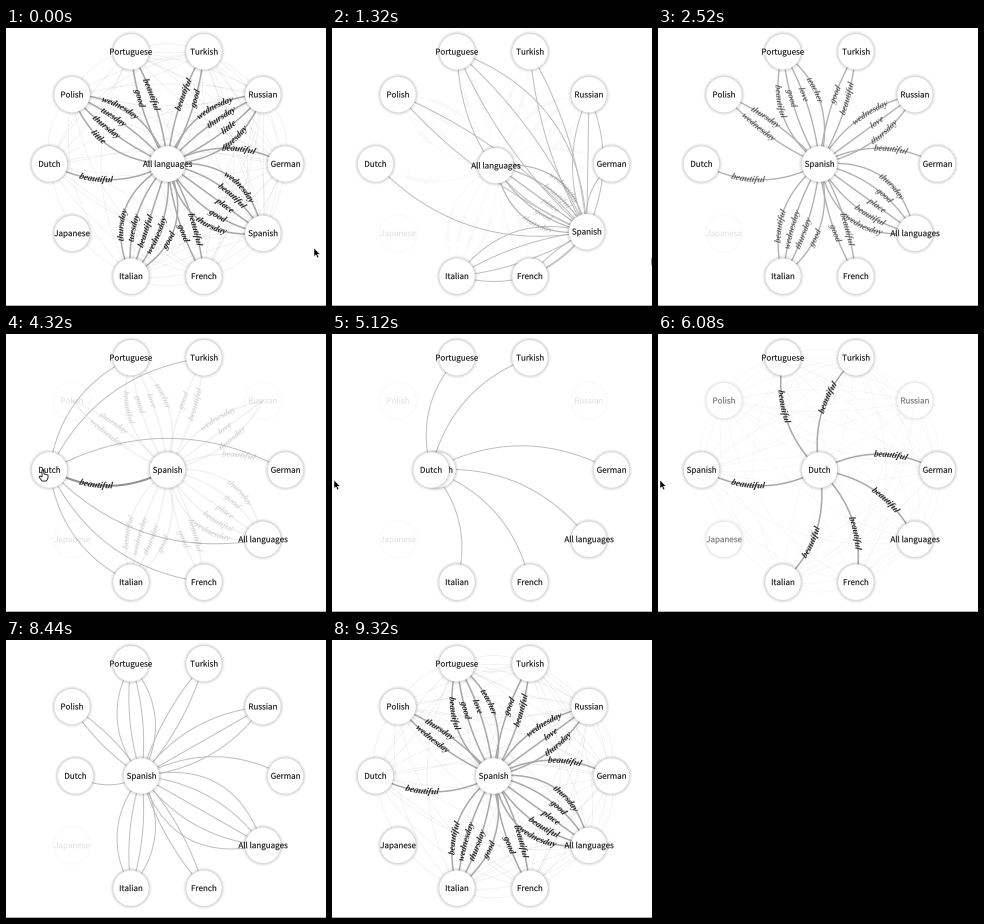
A matplotlib script for the animation above (9600 ms loop, 320 px wide and 278 px high).

```python
import itertools
import random

import matplotlib.pyplot as plt
import numpy as np
from matplotlib.animation import FuncAnimation
from matplotlib.collections import LineCollection, PathCollection
from matplotlib.patches import Circle, PathPatch, Polygon
from matplotlib.path import Path
from matplotlib.textpath import TextPath

WIDTH, HEIGHT, DPI = 320, 278, 64
LOOP_MS, STEP_MS = 9600, 40
PT = 72 / DPI
CENTER = np.array([161.5, 136.0])
RADIUS = 118

RING = ["German", "Spanish", "French", "Italian", "Japanese",
        "Dutch", "Polish", "Portuguese", "Turkish", "Russian"]
SLOTS = {name: CENTER + RADIUS * np.array([np.cos(a), np.sin(a)])
         for name, a in zip(RING, np.arange(10) * np.pi / 5)}
SLOTS["All languages"] = CENTER

# Shared words per focused language, listed from the left-hand curve outwards.
WORDS = {
    "All languages": {
        "Polish": "little thursday tuesday wednesday",
        "Portuguese": "good beautiful",
        "Turkish": "beautiful good",
        "Russian": "wednesday thursday little tuesday",
        "German": "beautiful",
        "Spanish": "wednesday beautiful place good thursday",
        "French": "beautiful good",
        "Italian": "good wednesday beautiful tuesday thursday",
        "Dutch": "beautiful",
    },
    "Spanish": {
        "Polish": "wednesday thursday",
        "Portuguese": "beautiful good love teacher",
        "Turkish": "good beautiful",
        "Russian": "wednesday love thursday",
        "German": "beautiful",
        "All languages": "thursday good place beautiful wednesday",
        "French": "beautiful good",
        "Italian": "good thursday wednesday beautiful",
        "Dutch": "beautiful",
    },
    "Dutch": {name: "beautiful" for name in
              ["Portuguese", "Turkish", "German", "All languages",
               "French", "Italian", "Spanish"]},
}

# hover start, hover end, click, old focus, new focus
CYCLES = [(0, 280, 1000, "All languages", "Spanish"),
          (3320, 3640, 4320, "Spanish", "Dutch"),
          (6280, 6520, 7440, "Dutch", "Spanish")]

U = np.linspace(0, 1, 41)


def ramp(t, start, end):
    return min(1.0, max(0.0, (t - start) / (end - start)))


def ease(u):
    return 4 * u ** 3 if u < 0.5 else 1 - 4 * (1 - u) ** 3


def left_of(v):
    return np.array([v[1], -v[0]])


def bulges(count):
    half = 0.056 * (count - 1)
    return [0.134] if count == 1 else np.linspace(half, -half, count)


def arc(a, b, bulge):
    d = b - a
    return a + np.outer(U, d) + np.outer(4 * bulge * U * (1 - U), left_of(d))


def outward_sign(a, b):
    return 1 if np.dot((a + b) / 2 - CENTER, left_of(b - a)) > -1 else -1


def centered_outline(text, size, **font):
    outline = TextPath((0, 0), text, size=size, prop=font)
    box = outline.get_extents()
    return outline.vertices - [(box.x0 + box.x1) / 2, 0], outline.codes


GLYPHS = {}
for text in set(" ".join(w for d in WORDS.values() for w in d.values()).split()):
    verts, codes = centered_outline(text, 9, family="Liberation Serif",
                                    style="italic", weight="bold")
    verts[:, 1] -= 2.4
    verts[:, 0] += 0.15 * verts[:, 1]
    GLYPHS[text] = verts, codes


def bend(word, curve):
    """Lay a word along a curve, always reading from left to right."""
    verts, codes = GLYPHS[word]
    share = 0.6
    if curve[-1, 0] < curve[0, 0]:
        curve, share = curve[::-1], 0.4
    steps = np.hypot(*np.diff(curve, axis=0).T)
    length = np.concatenate([[0], np.cumsum(steps)])
    tangent = np.gradient(curve, axis=0)
    tangent /= np.hypot(*tangent.T)[:, None] + 1e-9
    s = share * length[-1] + verts[:, 0]
    x, y, tx, ty = (np.interp(s, length, col) for col in (*curve.T, *tangent.T))
    return Path(np.column_stack([x + ty * verts[:, 1], y - tx * verts[:, 1]]), codes)


random.seed(4)
MESH_COUNT = {}
for pair in itertools.combinations(sorted(SLOTS), 2):
    MESH_COUNT[pair] = 0 if "Japanese" in pair else random.choice([1, 1, 2, 3])


def mesh_arcs(places, focus):
    curves = []
    for (m, n), count in MESH_COUNT.items():
        if count and focus not in (m, n):
            sign = outward_sign(places[m], places[n])
            curves += [arc(places[m], places[n], sign * k) for k in bulges(count)]
    return curves


fig = plt.figure(figsize=(WIDTH / DPI, HEIGHT / DPI), dpi=DPI, facecolor="white")
ax = fig.add_axes([0, 0, 1, 1])
ax.set(xlim=(0, WIDTH), ylim=(HEIGHT, 0))
ax.axis("off")
ax.plot([0, WIDTH], [277, 277], color="0.7", lw=PT)

mesh = LineCollection([], linewidths=0.7 * PT, zorder=1)
links = LineCollection([], zorder=2)
labels = PathCollection([], linewidths=0, zorder=3)
for layer in (mesh, links, labels):
    ax.add_collection(layer, autolim=False)


class Node:
    SHADOW = [(20.2, 0.035), (19.2, 0.08), (18.2, 0.14)]

    def __init__(self, name):
        self.discs = [(Circle((0, 0), 18, color="white", lw=0), 1)]
        self.discs += [(Circle((0, 0), r, fill=False, ec="black", lw=1.1 * PT), a)
                       for r, a in self.SHADOW]
        self.verts, self.codes = centered_outline(name, 8, family="Noto Sans CJK JP")
        self.label = PathPatch(Path(self.verts, self.codes), fc="0.05",
                               ec="0.05", lw=0.12 * PT)
        for patch in [disc for disc, _ in self.discs] + [self.label]:
            ax.add_patch(patch)

    def place(self, pos, alpha, zorder):
        for disc, strength in self.discs:
            disc.set(center=pos, alpha=strength * alpha, zorder=zorder)
        self.label.set_path(Path(self.verts * [1, -1] + pos + [0, 2.8], self.codes))
        self.label.set(alpha=alpha, zorder=zorder)


nodes = {name: Node(name) for name in SLOTS}

ARROW = np.array([(0, 0), (0, 8.5), (2, 6.8), (3.4, 10), (4.8, 9.3),
                  (3.5, 6.3), (6, 6.2)])
HAND = np.array([(-1, -2), (0.5, -2), (1, 2), (5, 3), (5, 6), (3.5, 9),
                 (-1, 9), (-4, 5), (-3, 4), (-1, 5)])
arrow = ax.add_patch(Polygon(ARROW, fc="black", ec="white", lw=0.5 * PT, zorder=9))
hand = ax.add_patch(Polygon(HAND, fc="white", ec="black", lw=0.8 * PT, zorder=9))
CURSOR = np.array([
    (0, 308, 220), (40, 308, 220), (120, 257, 212), (1080, 257, 212),
    (1400, 340, 235), (3280, 340, 235), (3281, -20, 150), (3320, 6, 146),
    (3440, 37, 138), (4440, 37, 138), (4720, 2, 146), (6200, 2, 146),
    (6280, 37, 138), (7640, 37, 138), (7641, -40, 138)])


def draw_cursor(t):
    tip = np.array([np.interp(t, CURSOR[:, 0], CURSOR[:, k]) for k in (1, 2)])
    over = any(np.hypot(*(tip - spot)) < 17 for spot in SLOTS.values())
    arrow.set(xy=ARROW + tip, visible=not over)
    hand.set(xy=HAND + tip, visible=over)


def draw(frame):
    t = frame * STEP_MS
    places = dict(SLOTS)
    for cycle in CYCLES:
        start, end, click, old, new = cycle
        following = [c for c in CYCLES if c[0] > start]
        if not following or t < following[0][0]:
            break
        places[old], places[new] = places[new], places[old]

    since = t - click
    hover = ramp(t, max(start, 40), end)
    move = ease(ramp(since, 40, 1590))
    fade_out = ramp(since, 0, 400)
    words_in = ramp(since, 1280, 1640)
    settle = ramp(since, 1640, 1880)

    before = dict(places)
    places[old] = before[old] + move * (before[new] - before[old])
    places[new] = before[new] + move * (before[old] - before[new])

    curves, colors, widths, paths, inks = [], [], [], [], []

    def add_link(a, b, words, alpha, ink, strength, sign=1):
        words = words.split()
        for word, k in zip(words, bulges(len(words))):
            curve = arc(places[a], places[b], k * sign)
            curves.append(curve)
            colors.append((0.75 - 0.09 * strength,) * 3 + (alpha,))
            widths.append((1 + 0.5 * strength) * PT)
            if ink > 0.01:
                paths.append(bend(word, curve))
                inks.append((0.16, 0.16, 0.16, ink))

    dim = (1 - 0.85 * hover) * (1 - fade_out)
    for other, words in WORDS[old].items():
        if other != new and dim > 0:
            add_link(old, other, words, dim, dim, 1)

    for other, words in WORDS[new].items():
        if other != old and hover > 0:
            sign = 1 if since > 0 else outward_sign(before[new], before[other])
            add_link(new, other, words, hover, words_in, words_in, sign)

    a, b = (old, new) if move < 0.5 else (new, old)
    emphasis = 1 + hover
    add_link(a, b, WORDS[a][b], 1, max(1 - fade_out, words_in),
             max(emphasis * (1 - fade_out), words_in))

    links.set(segments=curves, color=colors, linewidths=widths)
    labels.set_paths(paths)
    labels.set_facecolor(inks)

    focus, haze = (new, settle) if since > 0 else (old, 1 - hover)
    mesh.set(segments=mesh_arcs(places, focus) if haze > 0 else [],
             color=(0, 0, 0, 0.065 * haze))

    for i, (name, node) in enumerate(nodes.items()):
        linked = name in (old, new) or name in WORDS[new]
        alpha = 1 if linked else 1 - 0.9 * hover * (1 - settle)
        node.place(places[name], alpha, 6 if name == new else 5 + i * 0.01)
    draw_cursor(t)
    return []


animation = FuncAnimation(fig, draw, frames=LOOP_MS // STEP_MS, interval=STEP_MS,
                          init_func=lambda: draw(0), repeat=True, repeat_delay=0)
plt.show()
```
